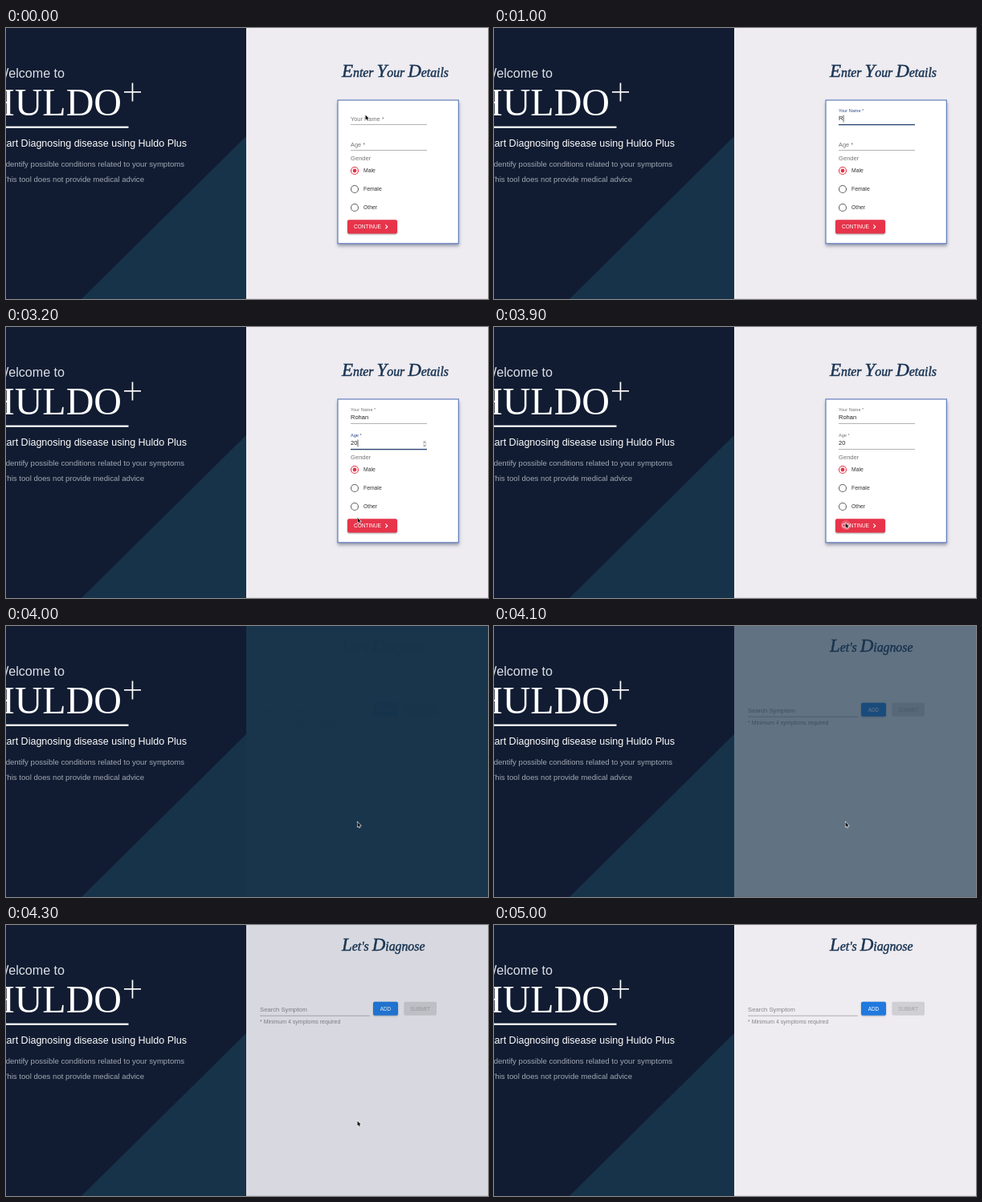
Animation, 600 px wide and 338 px high, one loop 5.1 s. Source, as an HTML page with a canvas:

```html
<!DOCTYPE html>
<html lang="en">
<head>
<meta charset="utf-8">
<title>Symptom checker</title>
<style>
html, body { margin: 0; width: 100%; height: 100%; overflow: hidden; background: #eeecf1; }
canvas { display: block; width: 600px; height: 338px; }
</style>
</head>
<body>
<canvas id="stage"></canvas>
<script>
const LOOP = 5100, W = 600, H = 338;
const SANS = '"Liberation Sans", Arial, sans-serif';
const SERIF = '"Liberation Serif", "Times New Roman", serif';
const NAVY = '#111c32', TEAL = '#17334a', PAPER = '#eeecf1', RED = '#e7344a';
const GREY = '#747478', FOCUS = '#2d4c8c', INK = '#1b3554', MUTED = '#a3a9b4';

const canvas = document.getElementById('stage');
const ctx = canvas.getContext('2d');
const dpr = window.devicePixelRatio || 1;
canvas.width = W * dpr;
canvas.height = H * dpr;

const clamp = v => Math.min(1, Math.max(0, v));
const mix = (a, b, p) => a + (b - a) * p;
const between = (t, a, b) => t >= a && t < b;

// CSS "ease" curve: cubic-bezier(.25, .1, .25, 1)
function ease(x) {
  const curve = (u, a, b) => 3 * u * (1 - u) ** 2 * a + 3 * u * u * (1 - u) * b + u ** 3;
  let lo = 0, hi = 1;
  for (let i = 0; i < 20; i++) {
    const mid = (lo + hi) / 2;
    if (curve(mid, 0.25, 0.25) < x) lo = mid; else hi = mid;
  }
  return x <= 0 ? 0 : x >= 1 ? 1 : curve(lo, 0.1, 1);
}

const progress = (t, from, length) => ease(clamp((t - from) / length));

function rect(x, y, w, h, color) {
  ctx.fillStyle = color;
  ctx.fillRect(x, y, w, h);
}

function text(str, x, y, size, color, align = 'left', font = SANS) {
  ctx.font = `${size}px ${font}`;
  ctx.textAlign = align;
  ctx.fillStyle = color;
  ctx.fillText(str, x, y);
}

function polyline(points, width, color) {
  ctx.beginPath();
  points.forEach(([x, y]) => ctx.lineTo(x, y));
  ctx.lineWidth = width;
  ctx.strokeStyle = color;
  ctx.stroke();
}

function disc(x, y, r, color) {
  ctx.beginPath();
  ctx.arc(x, y, r, 0, Math.PI * 2);
  ctx.fillStyle = color;
  ctx.fill();
}

function withShadow(blur, dy, color, draw) {
  ctx.save();
  ctx.shadowColor = color;
  ctx.shadowBlur = blur * dpr;
  ctx.shadowOffsetY = dy * dpr;
  draw();
  ctx.restore();
}

function pill(x, y, w, h, color) {
  ctx.beginPath();
  ctx.roundRect(x, y, w, h, 2);
  ctx.fillStyle = color;
  ctx.fill();
}

// Heading with tall initials and an even, pen-like weight
function heading(str, x, y) {
  ctx.textAlign = 'left';
  ctx.fillStyle = ctx.strokeStyle = INK;
  ctx.lineWidth = 0.45;
  for (const ch of str) {
    ctx.font = `italic ${/[A-Z]/.test(ch) ? 23 : 15.8}px ${SERIF}`;
    ctx.fillText(ch, x, y);
    ctx.strokeText(ch, x, y);
    x += ctx.measureText(ch).width;
  }
}

function banner() {
  rect(0, 0, 299, H, NAVY);
  ctx.beginPath();
  ctx.moveTo(299, 135);
  ctx.lineTo(94, H);
  ctx.lineTo(299, H);
  ctx.fillStyle = TEAL;
  ctx.fill();
  text('Welcome to', 73, 61.5, 16.1, '#dce0e6', 'right');
  text('HULDO', 144, 109, 48, '#fff', 'right', SERIF);
  rect(147, 79, 21, 1.7, '#fff');
  rect(156.6, 68.5, 1.7, 23, '#fff');
  rect(0, 122.6, 152.5, 2.2, '#fff');
  text('Start Diagnosing disease using Huldo Plus', 225, 148.3, 12.5, '#fff', 'right');
  text('Identify possible conditions related to your symptoms', 222, 172.5, 9.6, MUTED, 'right');
  text('This tool does not provide medical advice', 172, 191.7, 9.65, MUTED, 'right');
}

// Text field whose label floats up by p
function field(label, value, y, p, focused, caret) {
  const x = 429;
  text(label, x, mix(y - 4.8, y - 16, p), mix(7.4, 5.55, p), focused ? FOCUS : GREY);
  text(value, x, y - 5.6, 7.5, '#222');
  if (caret) rect(x + ctx.measureText(value).width + 0.3, y - 12, 0.7, 9, '#222');
  rect(x, y - 0.3, 95, 0.7, '#949498');
  if (focused) {
    const w = 95 * p;
    rect(x + (95 - w) / 2, y - 0.6, w, 1.4, '#2c4875');
  }
}

function spinner() {
  rect(518.8, 141.5, 4.6, 8.5, '#ececee');
  polyline([[519.8, 144.6], [521.1, 142.8], [522.4, 144.6]], 0.8, '#777');
  polyline([[519.8, 147], [521.1, 148.8], [522.4, 147]], 0.8, '#777');
}

function radio(label, y, on) {
  ctx.beginPath();
  ctx.arc(434, y, 4.5, 0, Math.PI * 2);
  ctx.lineWidth = 1.1;
  ctx.strokeStyle = on ? RED : '#66666a';
  ctx.stroke();
  if (on) disc(434, y, 2.4, RED);
  text(label, 445, y + 2.3, 6.8, '#333');
}

function detailsPage(t) {
  const keys = [1000, 1200, 1400, 1500, 1700];
  const name = 'Rohan'.slice(0, keys.filter(k => t >= k).length);
  const age = '20'.slice(0, [2100, 2200].filter(k => t >= k).length);
  const onName = between(t, 150, 1950), onAge = between(t, 1950, 3900);

  heading('Enter Your Details', 418, 61);
  withShadow(4, 2.5, 'rgba(40,50,80,.45)', () => rect(413, 90, 150.5, 179, '#fff'));
  ctx.lineWidth = 1.1;
  ctx.strokeStyle = '#5475b8';
  ctx.strokeRect(413, 90, 150.3, 178.8);

  field('Your Name *', name, 120.5, progress(t, 150, 200), onName,
    between(t, 200, 700) || between(t, 1000, 1900));
  field('Age *', age, 152.5, progress(t, 1950, 200), onAge,
    between(t, 1950, 2700) || between(t, 3200, 3700));
  if (onAge) spinner();

  text('Gender', 429, 165, 7.6, GREY);
  ['Male', 'Female', 'Other'].forEach((s, i) => radio(s, 178 + i * 23, i === 0));

  withShadow(2, 1, 'rgba(0,0,0,.35)', () => pill(425, 239.3, 62, 17.2, RED));
  if (t >= 3900) disc(438, 247, 6, 'rgba(255,255,255,.2)');
  text('CONTINUE', 433, 250.2, 6.5, '#fff');
  polyline([[472.3, 245.4], [474.8, 247.9], [472.3, 250.4]], 1.1, '#fff');
}

function symptomPage() {
  heading("Let's Diagnose", 418, 32);
  text('Search Symptom', 316, 108.4, 7.7, '#858589');
  rect(316, 112.8, 137, 0.7, '#949498');
  text('* Minimum 4 symptoms required', 316, 123.2, 7, '#858589');
  withShadow(2, 0.7, 'rgba(0,0,0,.3)', () => pill(457, 95.7, 31, 17, '#2079df'));
  text('ADD', 472.5, 106.5, 6.3, '#fff', 'center');
  pill(495.3, 95.7, 40.7, 17, '#d0cfd3');
  text('SUBMIT', 515.6, 106.5, 6.5, '#a3a3a7', 'center');
}

function pointer(t) {
  if (between(t, 1000, 2700) || t >= 4600) return;
  let x = 447.5, y = 108.5;
  if (t >= 2700) {
    const p = progress(t, 2700, 450), q = progress(t, 3250, 250);
    x = mix(447.5, 437.5, p);
    y = mix(108.5, 238, p) + 6.5 * q;
  }
  ctx.save();
  ctx.translate(x, y);
  ctx.scale(0.9, 0.9);
  ctx.beginPath();
  [[0, 0], [0, 6.6], [1.5, 5.3], [2.6, 7.8], [3.7, 7.3], [2.7, 4.9], [4.7, 4.8]]
    .forEach(([a, b]) => ctx.lineTo(a, b));
  ctx.closePath();
  ctx.lineWidth = 1.2;
  ctx.strokeStyle = '#fff';
  ctx.stroke();
  ctx.fillStyle = '#111';
  ctx.fill();
  ctx.restore();
}

function draw(t) {
  ctx.setTransform(dpr, 0, 0, dpr, 0, 0);
  rect(0, 0, W, H, PAPER);
  rect(299, 337, 301, 1, '#dfdde2');
  if (t < 3980) {
    detailsPage(t);
  } else {
    symptomPage();
    ctx.globalAlpha = 1 - progress(t, 3990, 500);
    rect(299, 0, 301, H, TEAL);
    ctx.globalAlpha = 1;
  }
  banner();
  pointer(t);
}

const start = performance.now();
function tick() {
  draw((performance.now() - start) % LOOP);
  requestAnimationFrame(tick);
}
tick();
</script>
</body>
</html>
```
